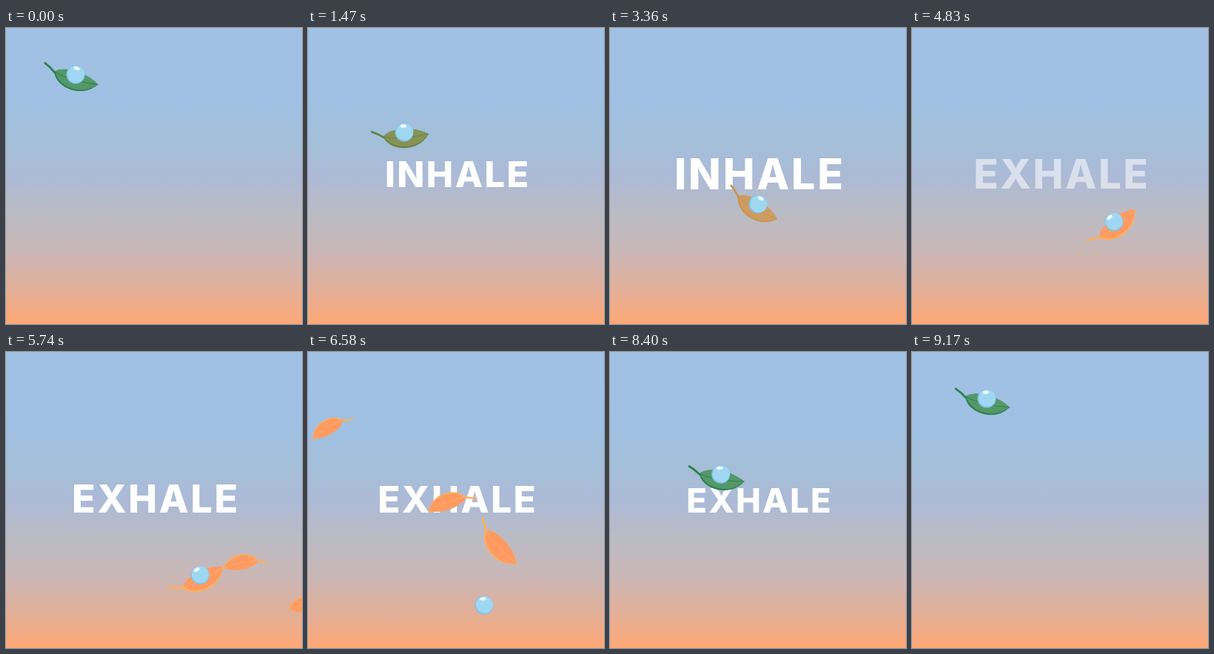
These frames come from a looping animation (400x400 px, 9.24 s). An HTML page with a canvas:

```html
<!DOCTYPE html>
<html lang="en">
<head>
<meta charset="utf-8">
<title>Inhale, exhale</title>
<style>
html, body { margin: 0; width: 100%; height: 100%; overflow: hidden; background: #a0c1e4; }
canvas { display: block; width: 400px; height: 400px; }
</style>
</head>
<body>
<canvas id="stage" width="400" height="400"></canvas>
<script>
const ctx = document.getElementById('stage').getContext('2d');
const LOOP = 9240, STEP = 70;
const DETACH = 6160, CATCH_START = 6860, CATCH = 7280;

const clamp = v => Math.min(1, Math.max(0, v));
const progress = (t, from, to) => clamp((t - from) / (to - from));
const mix = (a, b, k) => a.map((v, i) => v + (b[i] - v) * k);

const sky = ctx.createLinearGradient(0, 0, 0, 400);
['#a0c1e4', '#a0c1e4', '#9fc0e2', '#a3bfd9', '#acbad7', '#babbc4', '#c9b7b8', '#e0b09a', '#ffa876']
  .forEach((color, i, all) => sky.addColorStop(i / (all.length - 1), color));

// Key poses: time, x, y, angle in degrees
const bubblePath = [
  [0, 94, 63, 22], [1470, 130, 141, 2], [3360, 200, 238, 36], [4830, 273, 262, -33],
  [6580, 238, 342, 0], [CATCH, 215, 367, 10], [7630, 204, 304, 20.5],
  [8680, 130, 119, 14], [9170, 101, 63, 19], [LOOP, 94, 63, 22]
];
const loosePath = [[DETACH, 250, 322, -10], [6580, 263, 259, 53], [CATCH, 10, 77, 142], [7420, -60, 40, 155]];

// Body and rim colours through the seasons
const seasons = [
  { body: [84, 152, 106], rim: [44, 128, 76] },
  { body: [139, 147, 84], rim: [110, 132, 66] },
  { body: [201, 155, 100], rim: [194, 148, 74] },
  { body: [255, 154, 98], rim: [255, 176, 90] }
];
const [SPRING, , , AUTUMN] = seasons;

// Cubic Hermite through the key poses, with central-difference slopes
function poseAt(path, t) {
  let i = 0;
  while (i < path.length - 2 && t > path[i + 1][0]) i++;
  const span = path[i + 1][0] - path[i][0], k = progress(t, path[i][0], path[i + 1][0]);
  const slope = (n, c) => {
    const a = path[Math.max(0, n - 1)], b = path[Math.min(path.length - 1, n + 1)];
    return (b[c] - a[c]) / (b[0] - a[0]) * span;
  };
  return [1, 2, 3].map(c => {
    const a = path[i][c], b = path[i + 1][c], m = slope(i, c), n = slope(i + 1, c);
    return a + k * (m + k * (3 * (b - a) - 2 * m - n + k * (2 * (a - b) + m + n)));
  });
}

function seasonAt(t) {
  const p = progress(t, 0, 4830) * 3, i = Math.min(2, Math.floor(p));
  const a = seasons[i], b = seasons[i + 1];
  return { body: mix(a.body, b.body, p - i), rim: mix(a.rim, b.rim, p - i) };
}

const blade = new Path2D('M-28 7C-22 -4 10 -10 33 1C20 28 -20 26 -28 7Z');
const stem = new Path2D('M-44 1Q-36 3 -27 8');
const rib = new Path2D('M-28 7Q-2 11 33 1');

function drawLeaf([x, y, angle], { body, rim }, size = 1) {
  ctx.save();
  ctx.translate(x, y);
  ctx.rotate(angle * Math.PI / 180);
  ctx.scale(size, size);
  ctx.lineCap = 'round';
  ctx.strokeStyle = ctx.fillStyle = `rgb(${rim})`;
  ctx.lineWidth = 2.8;
  ctx.stroke(stem);
  ctx.fill(blade);
  ctx.lineWidth = .9;
  ctx.save();
  ctx.clip(blade);
  ctx.translate(.5, -2.2);
  ctx.fillStyle = `rgb(${body})`;
  ctx.fill(blade);
  ctx.restore();
  ctx.stroke(rib);
  ctx.restore();
}

function disc(x, y, rx, ry, color) {
  ctx.fillStyle = color;
  ctx.beginPath();
  ctx.ellipse(x, y, rx, ry, -.1, 0, 7);
  ctx.fill();
}

function drawBubble([x, y, angle]) {
  ctx.save();
  ctx.translate(x, y);
  ctx.rotate(angle * Math.PI / 180);
  disc(0, 0, 12.5, 12.5, '#7fc3e9');
  disc(.5, -.6, 11.5, 11.5, '#9fd7f3');
  disc(-1.5, -8.4, 4.2, 2.2, '#f4fcff');
  ctx.restore();
}

function drawWord(text, size, baseline, alpha) {
  const gap = size * .05;
  ctx.globalAlpha = alpha;
  ctx.font = `800 ${size}px Inter, "Open Sans", sans-serif`;
  ctx.letterSpacing = gap + 'px';
  ctx.textAlign = 'center';
  ctx.fillStyle = '#fff';
  ctx.fillText(text, 201 + gap / 2, baseline);
  ctx.globalAlpha = 1;
}

function drawWords(t) {
  const inhale = Math.min(58.5, 42 + t * .0045);
  const exhale = Math.max(45.3, 54.6 - (t - 4830) * .0029);
  drawWord('INHALE', inhale, 197 + inhale * .364, progress(t, 350, 980) - progress(t, 4060, 4480));
  drawWord('EXHALE', exhale, 216.5, progress(t, 4550, 5060) - progress(t, 8750, 9100));
}

// A leaf carried across the stage by the breath, gathering speed
function drawGust(t, begin, size) {
  const k = Math.max(0, (t - begin) / 1600) ** 1.5;
  if (k > 0 && k < 1.2) drawLeaf([430 - 460 * k, 360 - 291 * k, 181 - 31 * k], AUTUMN, size);
}

function render(t) {
  ctx.fillStyle = sky;
  ctx.fillRect(0, 0, 400, 400);
  drawWords(t);

  const [x, y, angle] = poseAt(bubblePath, t);
  if (t < DETACH) drawLeaf([x, y, angle], seasonAt(t));
  if (t >= CATCH_START) drawLeaf([x, y + 60 * (1 - progress(t, CATCH_START, CATCH)), angle], SPRING);
  drawBubble([x, y, t < DETACH ? angle : 0]);

  if (t >= DETACH && t < 7420) drawLeaf(poseAt(loosePath, t), AUTUMN);
  drawGust(t, 5122, .78);
  drawGust(t, 5545, .87);
}

const start = performance.now();
function tick(now) {
  render(Math.floor(Math.max(0, now - start) % LOOP / STEP) * STEP);
  requestAnimationFrame(tick);
}
render(0);
requestAnimationFrame(tick);
</script>
</body>
</html>
```
